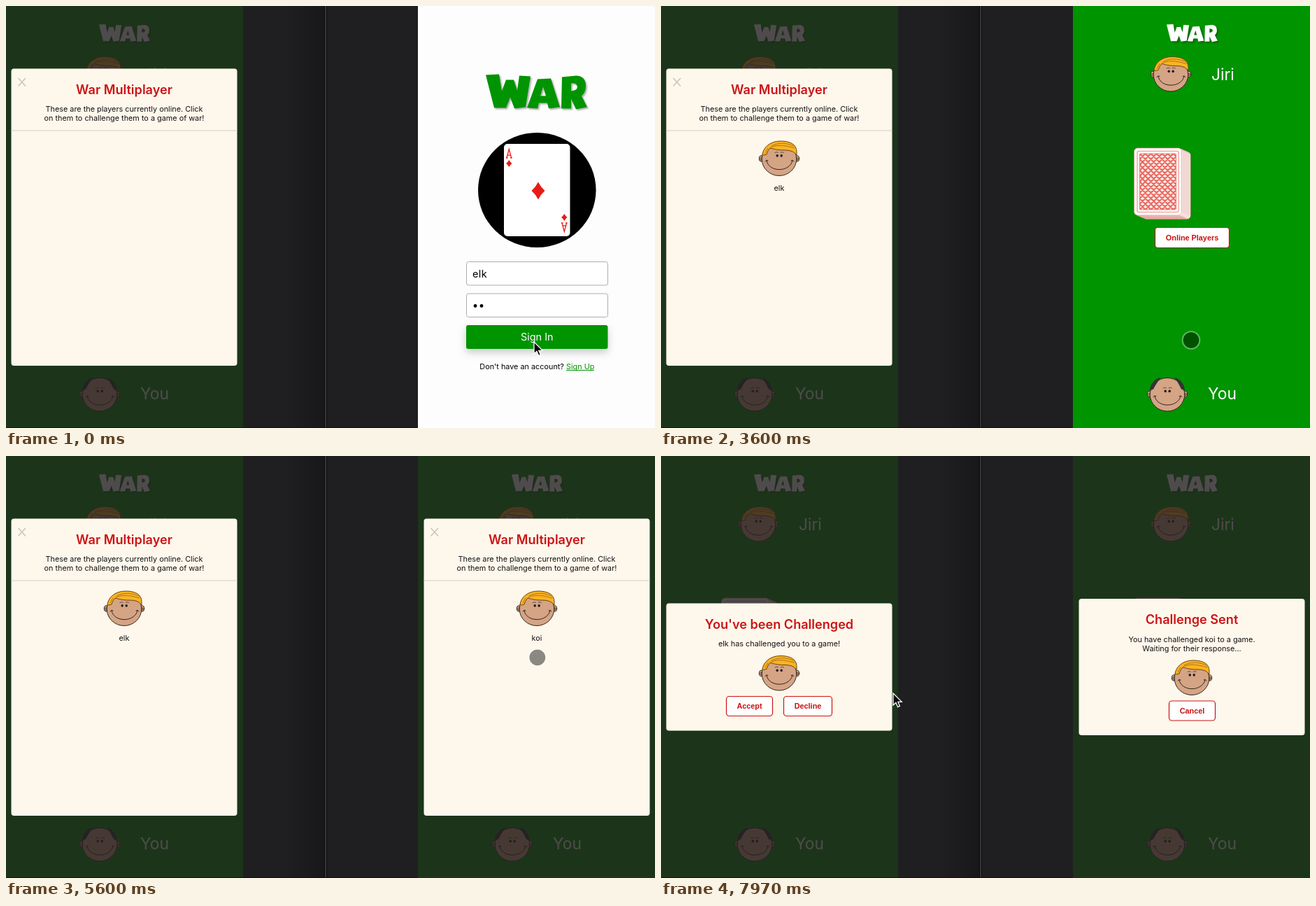
Write an HTML page with a canvas that moves like this. It is 928 by 603 pixels and loops after 8 s.

```html
<!DOCTYPE html>
<html lang="en">
<head>
<meta charset="utf-8">
<title>War</title>
<style>
  html, body { margin: 0; width: 100%; height: 100%; overflow: hidden; background: #1e1e20; }
  canvas { display: block; width: 928px; height: 603px; }
</style>
</head>
<body>
<canvas id="stage" width="928" height="603"></canvas>
<script>
const ctx = document.getElementById('stage').getContext('2d');
const LOOP = 8000;
const GREEN = '#009400', RED = '#cb1414', CREAM = '#fef7ec', SKIN = '#d4a485', INK = '#33261e';
const SANS = 'Inter, sans-serif', ARIAL = '"Liberation Sans", Arial, sans-serif';
const HOST = 'koi', GUEST = 'elk', BOT = 'Jiri';
const RIGHT = 590;

// Moments of the hard changes, in ms
const T = { focus: 1600, touch: 1900, clear: 2400, game: 3270, press: 4640, list: 4700,
            release: 5130, sent: 6500, received: 6800, leave: 7300, end: 7900 };

const clamp = v => Math.max(0, Math.min(1, v));
const ease = (t, a, b) => { const u = clamp((t - a) / (b - a)); return u * u * (3 - 2 * u); };
const mix = (a, b, u) => a + (b - a) * u;

function box(x, y, w, h, r, fill, stroke, width = 1) {
  ctx.beginPath();
  ctx.roundRect(x, y, w, h, r);
  if (fill) { ctx.fillStyle = fill; ctx.fill(); }
  if (stroke) { ctx.strokeStyle = stroke; ctx.lineWidth = width; ctx.stroke(); }
}

function text(s, x, y, size, color, { align = 'left', weight = 400, family = SANS, spacing = 0 } = {}) {
  ctx.font = `${weight} ${size}px ${family}`;
  ctx.textAlign = align;
  ctx.letterSpacing = spacing + 'px';
  ctx.fillStyle = color;
  ctx.fillText(s, x, y);
}

function ellipse(x, y, rx, ry, fill, stroke, width = 1) {
  ctx.beginPath();
  ctx.ellipse(x, y, rx, ry, 0, 0, Math.PI * 2);
  if (fill) { ctx.fillStyle = fill; ctx.fill(); }
  if (stroke) { ctx.strokeStyle = stroke; ctx.lineWidth = width; ctx.stroke(); }
}

function shape(d, fill, stroke, width = 1) {
  const p = new Path2D(d);
  if (fill) { ctx.fillStyle = fill; ctx.fill(p, 'evenodd'); }
  if (stroke) { ctx.strokeStyle = stroke; ctx.lineWidth = width; ctx.stroke(p); }
}

function at(x, y, draw, scale = 1) {
  ctx.save();
  ctx.translate(x, y);
  ctx.scale(scale, scale);
  draw();
  ctx.restore();
}

const WAR = 'M0 1L19 0 23 24 29 8 40 8 45 23 48 2 64 3 57 47 41 49 35 33 29 48 12 48Z' +
  'M74 7L93 6 106 47 90 49 88 41 76 41 74 49 59 48ZM78 31L86 31 82 18Z' +
  'M109 4L130 2Q143 3 143 17Q143 26 137 31L145 47 129 50 122 35 122 49 108 49ZM122 13L122 24Q131 23 131 18Q130 12 122 13Z';

function title(x, y, scale, color) {
  at(x, y, () => {
    ctx.save();
    ctx.shadowColor = 'rgba(0,0,0,.3)';
    ctx.shadowOffsetX = ctx.shadowOffsetY = 2;
    ctx.shadowBlur = 2;
    shape(WAR, color);
    ctx.restore();
  }, scale);
}

function face(x, y, blond) {
  at(x, y, () => {
    ctx.lineCap = ctx.lineJoin = 'round';
    for (const side of [-1, 1]) {
      ellipse(side * 25.5, 0, 3.2, 4.2, SKIN, INK);
      ellipse(side * 26, 0.5, 1.2, 1.9, null, INK, 0.7);
    }
    ellipse(0, 0.7, 24.8, 23.8, SKIN, INK);
    if (blond) {
      shape('M-24 -6C-23 -15 -14 -25 2 -25C16 -25 25 -20 25 -10L25 -5C21 -11 14 -12 6 -12C-3 -12 -9 -14 -13 -15C-16 -12 -17 -9 -18 -6L-22 -5Z', '#fbb323', '#6b460f');
      shape('M-13 -15C-7 -20 6 -20 22 -15M-11 -18C-2 -23 10 -23 21 -18M-20 -8L-16 -15', null, '#8a5c12', 0.7);
    } else {
      shape('M-25 -5C-25 -14 -18 -22 -9 -24C-13 -19 -17 -13 -20 -7Z', '#333');
      shape('M25 -5C25 -14 18 -22 10 -24C14 -19 17 -13 20 -7Z', '#333');
    }
    for (const ex of [-2.8, 3.2]) ellipse(ex, -4.2, 1.7, 1.9, '#221a16');
    shape('M-6 -8.5Q-4 -10 -1.5 -8.8M2 -8.8Q4 -10 6.5 -8.5', null, INK, 0.7);
    shape('M-18 3C-15 20 15 20 19 3M-20 4Q-18 1 -16 3M17 3Q19 1 21 4', null, INK, 1);
  });
}

function diamond(x, y, w, h) {
  shape(`M${x} ${y - h}Q${x + w * .4} ${y - h * .4} ${x + w} ${y}Q${x + w * .4} ${y + h * .4} ${x} ${y + h}` +
        `Q${x - w * .4} ${y + h * .4} ${x - w} ${y}Q${x - w * .4} ${y - h * .4} ${x} ${y - h}Z`, '#e81c17');
}

function cardCorner() {
  shape('M-3.3 6L0 -6.5 3.3 6M-2.2 2.2H2.2M-4.4 6H-1.8M1.8 6H4.4', null, '#e81c17', 1.3);
  diamond(0, 14, 4.2, 5);
}

function ace() {
  ellipse(759.3, 263, 84.3, 82, '#000');
  box(712, 197, 94.5, 132, 5, '#fff');
  at(719.3, 211, cardCorner);
  at(798.3, 316, () => { ctx.rotate(Math.PI); cardCorner(); });
  diamond(761, 264, 9.5, 12.5);
}

function deck(x, y) {
  for (let i = 6; i >= 0; i--) box(x + i * 2.1, y + i * 0.9, 68, 96, 5, '#fff', '#d9897f', 0.7);
  box(x + 4.5, y + 4.5, 59, 87, 2, null, '#f0aaa3', 1.5);
  ctx.save();
  box(x + 8, y + 8, 52, 80, 1, '#fdece9', '#ea7a70');
  ctx.clip();
  ctx.beginPath();
  for (let k = -80; k < 140; k += 8) {
    ctx.moveTo(x + 8 + k, y + 8); ctx.lineTo(x + 88 + k, y + 88);
    ctx.moveTo(x + 8 + k, y + 88); ctx.lineTo(x + 88 + k, y + 8);
  }
  ctx.strokeStyle = '#e8695f';
  ctx.lineWidth = 2.1;
  ctx.stroke();
  ctx.restore();
}

function button(label, x, y, w, h) {
  box(x + .5, y + .5, w - 1, h - 1, 4, '#fff', RED, 1.2);
  text(label, x + w / 2, y + h / 2 + 3.7, 10.85, '#c81010', { align: 'center', weight: 700, family: ARIAL });
}

// The card table; coordinates are those of the right-hand window
function table(dx) {
  at(dx, 0, () => {
    ctx.fillStyle = GREEN;
    ctx.fillRect(589, 0, 340, 603);
    title(723, 26, .503, '#fff');
    face(729, 97.5, true);
    text(BOT, 787, 105.5, 22.8, '#fff');
    deck(676.5, 203);
    button('Online Players', 706, 316, 107, 30);
    face(724, 554.5, false);
    text('You', 782, 562, 22.8, '#fff');
  });
}

function dim(x, amount) {
  ctx.fillStyle = `rgba(35,31,33,${.8 * amount})`;
  ctx.fillRect(x, 0, 339, 603);
}

function panel(x, y, h, heading, lines) {
  box(x + 7.5, y, 323, h, 4, CREAM);
  text(heading, x + 169, y + 36, 18.1, RED, { align: 'center', weight: 600 });
  lines.forEach((line, i) =>
    text(line, x + 169, y + 61.8 + i * 13, 10.85, '#111', { align: 'center' }));
}

function playerList(x, name) {
  panel(x, 89.5, 424.5, 'War Multiplayer',
    ['These are the players currently online. Click', 'on them to challenge them to a game of war!']);
  shape(`M${x + 17.5} 103L${x + 28} 114.5M${x + 28} 103L${x + 17.5} 114.5`, null, '#c9c3ba', 1.5);
  ctx.fillStyle = '#d3cec6';
  ctx.fillRect(x + 7.5, 177.5, 323, 1);
  if (!name) return;
  face(x + 169, 218, true);
  text(name, x + 169, 263.5, 10.85, '#111', { align: 'center' });
}

function challenged() {
  panel(0, 210.5, 182, "You've been Challenged", [GUEST + ' has challenged you to a game!']);
  face(169, 310.5, true);
  button('Accept', 93, 343, 67, 29);
  button('Decline', 175, 343, 70, 29);
}

function challengeSent() {
  panel(RIGHT, 204, 195, 'Challenge Sent',
    [`You have challenged ${HOST} to a game.`, 'Waiting for their response...']);
  face(RIGHT + 169, 317, true);
  button('Cancel', 726, 349.5, 67, 29);
}

function field(y, focused) {
  if (focused) box(659, y + .5, 201, 33, 3, '#fff', '#d58a1c', 2);
  else box(658.5, y + .5, 202, 33.5, 3, '#fff', '#adadad');
}

function signIn(t) {
  ctx.fillStyle = '#fdfdfd';
  ctx.fillRect(589, 0, 339, 603);
  title(686, 97.5, 1, GREEN);
  ace();
  const filled = t < T.clear, focused = filled && t >= T.focus;
  field(365, false);
  field(410.5, focused);
  if (filled) {
    text(GUEST, 667, 387.5, 14.46, '#000', { spacing: .4 });
    for (const x of [671, 680]) ellipse(x, 428.5, 2.4, 2.4, '#000');
    if (focused) { ctx.fillStyle = '#000'; ctx.fillRect(684, 419, 1, 18); }
  } else {
    text('Username', 667, 387.5, 14.46, '#a3a3a3', { spacing: .4 });
    text('Password', 667, 432.5, 14.46, '#a3a3a3', { spacing: .4 });
  }
  ctx.save();
  ctx.shadowColor = 'rgba(0,0,0,.2)';
  ctx.shadowBlur = 11;
  ctx.shadowOffsetY = 5;
  box(658, 456, 202.5, 34, 3, GREEN);
  ctx.restore();
  text('Sign In', 759.3, 478, 14.46, '#fff', { align: 'center' });
  text("Don't have an account?", 677.3, 518.8, 10.85, '#000');
  text('Sign Up', 801, 518.8, 10.85, GREEN);
  ctx.fillStyle = GREEN;
  ctx.fillRect(801, 520, 40, 1);
}

function backdrop() {
  ctx.fillStyle = '#1f1f21';
  ctx.fillRect(339, 0, 250, 603);
  const g = ctx.createLinearGradient(400, 0, 456, 0);
  g.addColorStop(0, 'rgba(24,24,26,0)');
  g.addColorStop(1, '#18181a');
  ctx.fillStyle = g;
  ctx.fillRect(400, 0, 56, 603);
  ctx.fillStyle = '#0c0c0d';
  ctx.fillRect(455, 0, 4, 603);
  ctx.fillStyle = '#656567';
  ctx.fillRect(456.5, 0, 1, 603);
}

function pointer(t) {
  let x, y;
  if (t < T.touch) {
    const u = ease(t, 500, 1400);
    x = mix(755, 758, u);
    y = mix(480, 475, u);
  } else if (t < T.leave) {
    const up = ease(t, 3750, 4500), toFace = ease(t, 5250, 6050);
    x = 758 + up + toFace * 2;
    y = 477.5 - up * 146.5 - toFace * 105.5;
  } else {
    // Curved sweep to the left-hand window
    const u = ease(t, T.leave, T.end), v = 1 - u;
    x = v * v * 761 + 2 * u * v * 634 + u * u * 332;
    y = v * v * 225.5 + 2 * u * v * 367 + u * u * 339;
  }
  if (t >= T.touch && x > 589) {
    ctx.save();
    ctx.beginPath();
    ctx.rect(589, 0, 339, 603);
    ctx.clip();
    ellipse(x, y, 11.5, 11.5, 'rgba(0,0,0,.45)');
    ellipse(x, y, 12.3, 12.3, null, 'rgba(255,255,255,.36)', 2);
    ctx.restore();
  } else {
    at(x, y, () => {
      ctx.lineJoin = 'miter';
      shape('M0 0V17L3.9 13.4 6.6 19.6 9.4 18.4 6.8 12.3H12.2Z', '#000', '#fff', 1.3);
    });
  }
}

function draw(t) {
  backdrop();

  table(-RIGHT);
  dim(0, 1);
  if (t < T.received) playerList(0, t >= T.game ? GUEST : '');
  else challenged();

  ctx.save();
  ctx.beginPath();
  ctx.rect(589, 0, 339, 603);
  ctx.clip();
  if (t < T.game) signIn(t);
  else {
    table(0);
    if (t >= T.list) {
      const shown = ease(t, T.list, T.list + 120);
      dim(589, shown);
      ctx.globalAlpha = shown;
      if (t < T.sent) playerList(RIGHT, HOST);
      else challengeSent();
      ctx.globalAlpha = 1;
    }
    if (t >= T.press && t < T.release) {
      ctx.fillStyle = t < T.list ? 'rgba(51,181,229,.4)' : '#add9d3';
      ctx.fillRect(706, 316, 107, 30);
    }
  }
  ctx.restore();

  ctx.fillStyle = 'rgba(15,15,16,.8)';
  ctx.fillRect(0, 602, 589, 1);
  pointer(t);
}

const start = performance.now();
function frame() {
  draw((performance.now() - start) % LOOP);
  requestAnimationFrame(frame);
}
frame();
</script>
</body>
</html>
```
